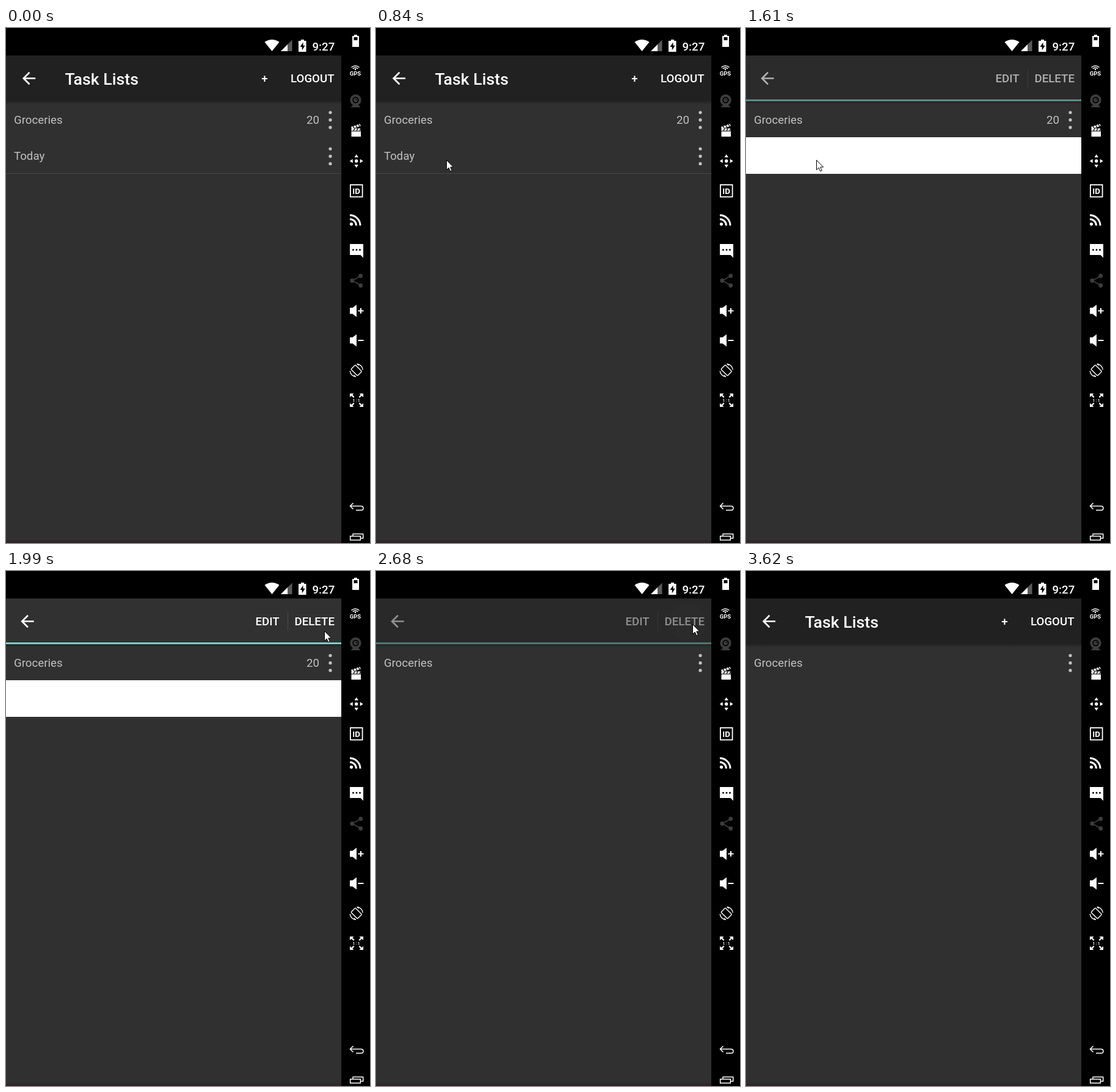
An HTML page that plays this animation: 596 by 844 pixels, repeating every 3.85 s.

```html
<!DOCTYPE html>
<html lang="en">
<head>
<meta charset="utf-8">
<title>Task lists</title>
<style>
  html, body { margin: 0; width: 100%; height: 100%; overflow: hidden; background: #000; }
  svg { display: block; width: 100%; height: 100%; }
  text { font: 400 18.67px Roboto, sans-serif; fill: #c1c1c1; }
  .bar text, .status text { font-weight: 500; fill: #fff; }
  .bar .title { font-size: 26.67px; }
  .side text { font-weight: 700; fill: #fff; text-anchor: middle; }
  .line { fill: none; stroke: #fff; }
</style>
</head>
<body>
<svg viewBox="0 0 596 844">
  <defs>
    <linearGradient id="shade" x2="0" y2="1">
      <stop offset="0" stop-color="#000" stop-opacity=".28"/>
      <stop offset="1" stop-color="#000" stop-opacity="0"/>
    </linearGradient>
    <path id="arrow" transform="scale(1.333)" fill="#fff"
      d="M20 11H7.83l5.59-5.59L12 4l-8 8 8 8 1.41-1.41L7.83 13H20z"/>
    <g id="kebab" fill="#c1c1c1">
      <circle cy="-12.2" r="2.6"/><circle r="2.6"/><circle cy="12.2" r="2.6"/>
    </g>
    <path id="speaker" fill="#fff" d="M563 -5h4.500l6.500-5v20l-6.500-5H563z"/>
    <path id="corner" fill="#fff" d="M-11 -11h6.500l-2.200 2.200 3.200 3.200-1.600 1.600-3.200-3.200-2.700 2.200z"/>
    <path id="pad" fill="#fff" d="M0 -11l3.200 5h-6.400z"/>
  </defs>

  <rect width="596" height="844"/>

  <g class="status">
    <path fill="#fff" d="M435.500 38L423.500 23Q435.500 15 447.500 23z"/>
    <path fill="#5a5a5a" d="M468.500 19.500V38H450z"/>
    <path fill="#fff" d="M461 27V38H450z"/>
    <path fill="#fff" d="M483 19h5v2h3.500v18h-12.500V21h4z"/>
    <path d="M486.500 23.500l-5 7.500h3.200v5.500l5-7.700h-3.200z"/>
    <text x="501.500" y="36.500">9:27</text>
  </g>

  <rect y="45" width="549" height="799" fill="#303030"/>
  <rect y="840" width="549" height="4" fill="#30262a"/>
  <rect y="45" width="549" height="75" fill="#212121"/>
  <rect y="120" width="549" height="5" fill="url(#shade)"/>

  <text x="13" y="156.500">Groceries</text>
  <text id="count" x="492" y="156.500">20</text>
  <use href="#kebab" x="531" y="150.700"/>
  <g id="today">
    <text x="13" y="216">Today</text>
    <use href="#kebab" x="531" y="210.200"/>
    <rect y="238" width="549" height="1" fill="#474747"/>
  </g>
  <rect id="picked" y="179" width="549" height="60" fill="#fff"/>

  <g id="main" class="bar">
    <use href="#arrow" x="21.500" y="66.500"/>
    <text class="title" x="96.500" y="93">Task Lists</text>
    <text x="423.500" y="89" text-anchor="middle">+</text>
    <text x="466" y="89">LOGOUT</text>
  </g>
  <g id="mode" class="bar">
    <rect y="45" width="549" height="75" fill="#313131"/>
    <rect y="117" width="549" height="3" fill="#80cbc4"/>
    <rect x="461" y="67" width="1" height="31" fill="#4b4b4b"/>
    <circle id="ripple" cx="510" cy="83" r="30" fill="#fff" opacity=".025"/>
    <use href="#arrow" x="19" y="66.500"/>
    <text x="408.500" y="89">EDIT</text>
    <text x="472.500" y="89">DELETE</text>
  </g>

  <g class="side">
    <!-- battery, GPS, camera -->
    <path fill="#fff" d="M570 11h5v2h3v18h-11V13h3z"/>
    <rect x="569.500" y="15" width="6" height="5"/>
    <path class="line" stroke-width="1.500" d="M565.500 64.500q6.500-5 13 0M567.700 66.700q4.300-3.400 8.600 0"/>
    <circle cx="572" cy="68" r="1.200" fill="#fff"/>
    <text x="572" y="77.500" style="font-size:9.500px">GPS</text>
    <g fill="#3d3d3d">
      <circle cx="572.500" cy="118" r="9.200"/>
      <path d="M568 126h9l3.500 4h-16z"/>
      <circle cx="572.500" cy="118" r="5.200" fill="#000"/>
      <circle cx="572.500" cy="118" r="3.400"/>
      <circle cx="573.500" cy="117" r="1.100" fill="#000"/>
    </g>
    <!-- clapperboard -->
    <path fill="#fff" d="M565.500 169.500H581V178h-15.500zM565.500 164.500H581v4h-15.500zM565 162l14.500-5 1.300 3.500-14.500 5z"/>
    <path stroke="#000" stroke-width="1.400" d="M569 168.500l2-4M574 168.500l2-4M579 168.500l2-4M570 164l-2-3.500M574.500 162.500l-2-3.500M579 161l-2-3.500"/>
    <!-- direction pad -->
    <g transform="translate(573.700 218)">
      <circle r="2.700" fill="#fff"/>
      <use href="#pad"/><use href="#pad" transform="rotate(90)"/>
      <use href="#pad" transform="rotate(180)"/><use href="#pad" transform="rotate(270)"/>
    </g>
    <rect class="line" x="563.900" y="257" width="19.700" height="19.700" stroke-width="1.800"/>
    <text x="573.700" y="272" style="font-size:13.500px">ID</text>
    <!-- feed -->
    <circle cx="565.500" cy="321.300" r="2.600" fill="#fff"/>
    <path class="line" stroke-width="3" d="M563 313.300a10.500 10.500 0 0 1 10.500 10.500M563 306.800a17 17 0 0 1 17 17"/>
    <!-- message -->
    <path fill="#fff" d="M563 354h22v22.500l-4.500-4.500H563z"/>
    <g><circle cx="568.500" cy="363.500" r="1.500"/><circle cx="574" cy="363.500" r="1.500"/><circle cx="579.500" cy="363.500" r="1.500"/></g>
    <!-- share -->
    <g fill="#3d3d3d">
      <path fill="none" stroke="#3d3d3d" stroke-width="1.800" d="M580.500 406.500L567 414l13.500 7.500"/>
      <circle cx="580.700" cy="406.200" r="3.400"/><circle cx="566.800" cy="414" r="3.400"/><circle cx="580.700" cy="422" r="3.400"/>
    </g>
    <!-- volume -->
    <use href="#speaker" y="463.500"/>
    <path class="line" stroke-width="2" d="M576.500 463.500h9M581 459v9"/>
    <use href="#speaker" y="512"/>
    <path class="line" stroke-width="2" d="M576.500 512h9"/>
    <!-- rotate -->
    <g transform="translate(573.700 561)" class="line" stroke-width="1.400">
      <rect x="-5" y="-7.500" width="10" height="15" rx="1" transform="rotate(-45)"/>
      <path d="M1 -10.500A10.500 10.500 0 0 1 10.500 -1M-1 10.500A10.500 10.500 0 0 1 -10.500 1"/>
      <path d="M1 -10.500l3 2.500M-1 10.500l-3-2.500"/>
    </g>
    <!-- actual size -->
    <g transform="translate(574 610)">
      <use href="#corner"/><use href="#corner" transform="scale(-1 1)"/>
      <use href="#corner" transform="scale(1 -1)"/><use href="#corner" transform="scale(-1 -1)"/>
      <text y="3" style="font-size:7.500px;font-weight:500;letter-spacing:1px">1:1</text>
    </g>
    <!-- back, recents -->
    <path class="line" stroke-width="1.500" d="M568.500 778.500l-5 5 5 5M563.500 783.500h17.500q4 0 4 3.400t-4 3.400h-8"/>
    <path class="line" stroke-width="1.500" d="M563.700 832.700h16.600v6.600h-16.600zM568 832.500v-3.300h16.700v7h-4"/>
  </g>

  <path id="cursor" fill="#fff" stroke="#000" stroke-width="1"
    d="M.5 .5V16.500L4.200 13 6.700 18.800 9.200 17.700 6.800 12H11.600z"/>
</svg>
<script>
  const LOOP = 3850, LEAD = 124, STEP = 77.2;
  const el = id => document.getElementById(id);
  const [count, today, picked, main, mode, ripple, cursor] =
    ['count', 'today', 'picked', 'main', 'mode', 'ripple', 'cursor'].map(el);

  const easeOut = u => 1 - (1 - u) ** 1.7;
  const easeBoth = u => u * u * (3 - 2 * u);
  const easeIn = u => u ** 1.3;

  // Pointer strokes: first step, last step, from, bend, to, easing
  const strokes = [
    [0, 6, [404, 720], [250, 440], [118, 226], easeOut],
    [6, 9, [118, 226], [116, 220], [115, 216], easeOut],
    [19, 23, [115, 216], [320, 130], [522, 102], easeBoth],
    [23, 30, [522, 102], [519, 94], [518, 87], easeOut],
    [39, 44, [518, 87], [485, 420], [545, 823], easeIn]
  ];

  // Opacity of each bar by step, linear between the points
  const mainFade = [[16, 1], [17, .78], [18, 0], [33, 0], [34, .12], [35, .62], [36, .93], [40, 1]];
  const modeFade = [[17, 0], [18, .15], [19, .64], [20, 1], [32, 1], [33, .5], [34, 0]];

  function level(points, k) {
    const i = points.findIndex(p => p[0] >= k);
    if (i < 0) return points[points.length - 1][1];
    if (i === 0) return points[0][1];
    const [a, va] = points[i - 1], [b, vb] = points[i];
    return va + (vb - va) * (k - a) / (b - a);
  }

  function pointer(k) {
    const [from, to, a, m, b, ease] = strokes.filter(s => s[0] <= k).pop();
    const u = ease(Math.min(1, (k - from) / (to - from)));
    return a.map((v, i) => Math.round((1 - u) ** 2 * v + 2 * u * (1 - u) * m[i] + u * u * b[i]));
  }

  const show = (node, on) => node.setAttribute('visibility', on ? 'visible' : 'hidden');

  function draw(t) {
    const k = Math.floor((t - LEAD) / STEP);
    const moving = k >= 0 && k < 45;
    show(cursor, moving);
    if (moving) cursor.setAttribute('transform', `translate(${pointer(k)})`);
    show(count, k < 33);
    show(today, k < 17);
    show(picked, k >= 17 && k < 33);
    show(ripple, k >= 30);
    main.setAttribute('opacity', level(mainFade, k));
    mode.setAttribute('opacity', level(modeFade, k));
  }

  const start = performance.now();
  function tick() {
    draw((performance.now() - start) % LOOP);
    requestAnimationFrame(tick);
  }
  tick();
</script>
</body>
</html>
```
